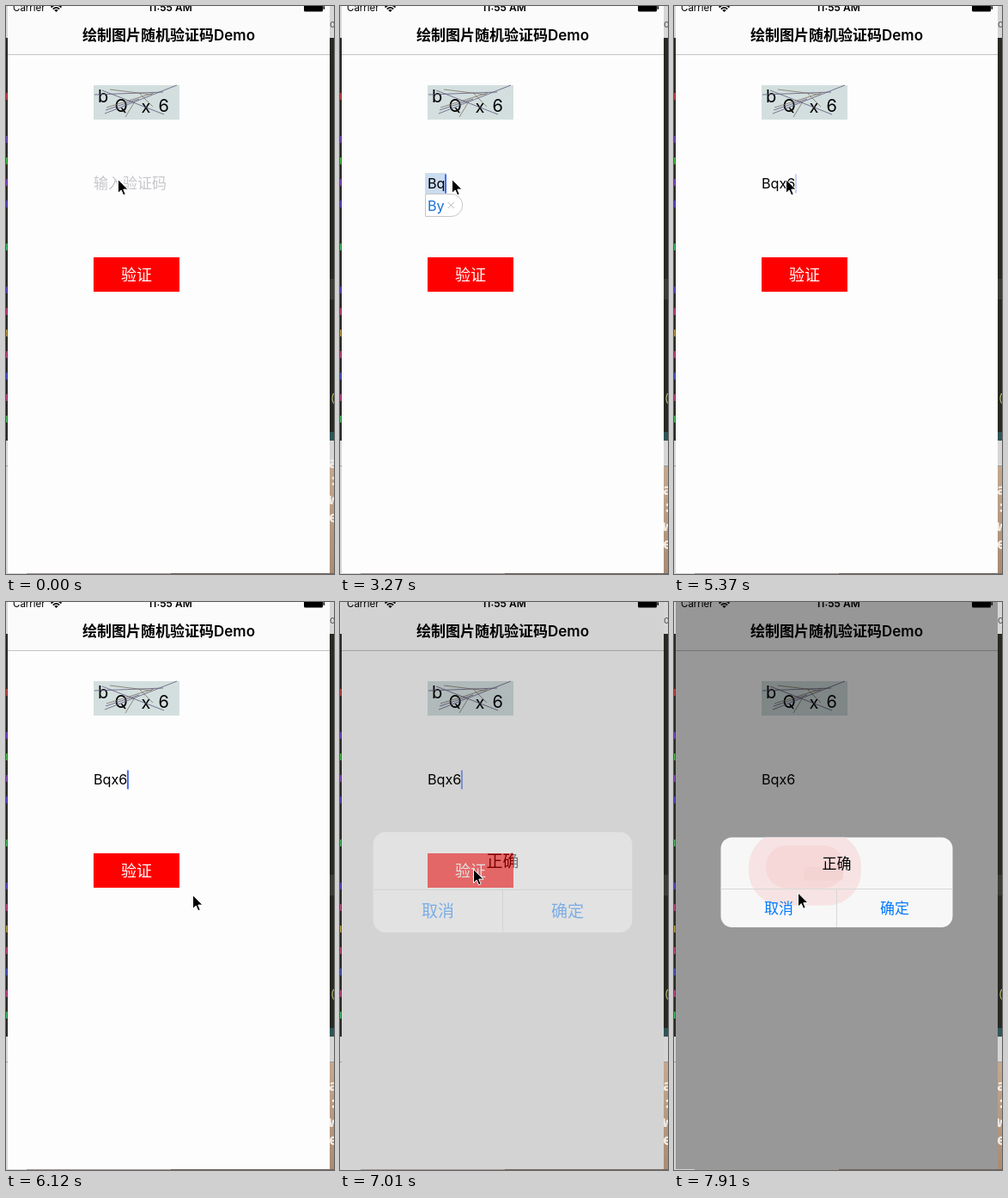
Animation of 382x660 px, one loop 8 s. Source, as an HTML page:

```html
<!DOCTYPE html>
<html lang="zh-CN">
<head>
<meta charset="utf-8">
<style>
  html, body { margin: 0; width: 100%; height: 100%; overflow: hidden; background: #ddd; }
  svg { display: block; font: 17px Inter, "Noto Sans CJK SC", "Noto Sans CJK", sans-serif; }
  .mid { text-anchor: middle; }
  .bold { font-weight: 600; }
  .medium { font-weight: 500; }
  .code { font: bold 18px "Noto Sans Mono", monospace; }
  .field { font-size: 16.2px; }
</style>
</head>
<body>
<svg width="382" height="660" viewBox="0 0 382 660">
  <defs>
    <linearGradient id="tan" x2="0" y2="1">
      <stop stop-color="#c4a88f"/><stop offset="1" stop-color="#a98b73"/>
    </linearGradient>
    <clipPath id="plate"><rect x="54.500" y="273.500" width="270" height="104.500" rx="13"/></clipPath>
  </defs>

  <!-- desktop behind the phone window -->
  <rect width="382" height="660" fill="#d6d6d6"/>
  <rect y="37" width="382" height="468" fill="#282923"/>
  <rect y="534" width="382" height="1" fill="#999"/>
  <rect x="376" y="535" width="6" height="125" fill="url(#tan)"/>
  <rect x="377" y="317" width="5" height="24" fill="#3b3c37"/>
  <rect x="377" y="495" width="5" height="10" fill="#2f5558"/>
  <g id="specks"></g>
  <text x="377" y="25" font-size="11" fill="#555">or</text>
  <text x="378" y="460" font-size="13" fill="#b9c07a">(</text>
  <g id="scroll" class="code" fill="#f3ece5">
    <text x="376" y="537">a</text><text x="376" y="557">:</text>
    <text x="376" y="579">w</text><text x="376" y="600">e</text>
  </g>

  <!-- phone screen -->
  <rect x="2" width="375" height="659" fill="#fdfdfd"/>
  <rect x="2" width="375" height="56" fill="#fbfbfb"/>
  <path d="M2 56.5H377" stroke="#c3c3c3"/>
  <path d="M24 659.5H192" stroke="#a49a96"/>
  <path d="M192 659.5H382" stroke="#74675f"/>
  <text x="8" y="6" font-size="11.5">Carrier</text>
  <path d="M52.500 1.500Q58.500-4 64.500 1.500M54.800 3.600Q58.500.3 62.200 3.600" fill="none" stroke="#000" stroke-width="1.7"/>
  <path d="M56.200 4.800Q58.500 3 60.800 4.800L58.500 7Z"/>
  <text class="mid bold" x="191" y="6" font-size="12">11:55 AM</text>
  <rect x="347" y="-3" width="22" height="9.500" rx="1.500"/>
  <rect x="369.500" y="0" width="1.500" height="4" rx=".7"/>
  <text class="mid bold" x="189.500" y="40">绘制图片随机验证码Demo</text>

  <rect x="102" y="92" width="100" height="40" fill="#d3dfde"/>
  <g font-size="20">
    <text x="107" y="111.500">b</text><text x="126.500" y="123">Q</text>
    <text x="157.500" y="124">x</text><text x="177.500" y="123">6</text>
  </g>
  <g fill="none" stroke-width=".8">
    <path d="M103 103L183 100M115 125L199 92M112 98L184 126M116 121L155 108" stroke="#5f587c"/>
    <path d="M121 97L170 103M117 118L172 101M139 129L150 111M155 101L171 117" stroke="#7c7063"/>
  </g>

  <rect id="mark" x="99" y="194" height="24" fill="#cbdcf0"/>
  <text id="hint" x="102" y="212" fill="#c7c7cd">输入验证码</text>
  <text id="typed" class="field" x="102" y="212"></text>
  <rect id="caret" y="195.500" width="2" height="22" fill="#426bf2"/>
  <g id="popup">
    <path id="bubble" fill="#fff" stroke="#c6c6c6"/>
    <text id="guess" class="field" x="102" y="237.500" fill="#1670d8"></text>
    <path id="cross" d="M-3.500-3.500L3.500 3.500M3.500-3.500L-3.500 3.500" stroke="#b4b4b4"/>
  </g>

  <rect x="102" y="292" width="100" height="40" fill="#f00"/>
  <text class="mid" x="152" y="318.500" font-size="18" font-weight="300" fill="#fff">验证</text>

  <rect id="dim" x="2" width="375" height="659"/>
  <g id="alert">
    <rect x="54.500" y="273.500" width="270" height="104.500" rx="13" fill="#f7f7f7"/>
    <g id="glow" clip-path="url(#plate)">
      <rect x="87" y="268" width="131" height="84.500" rx="39" fill="#f7e3e3"/>
      <rect x="107" y="283" width="91" height="49.500" rx="24" fill="#f6d8d8"/>
      <rect x="151" y="308" width="46" height="16" rx="5" fill="#f4d3d3"/>
    </g>
    <path d="M54.500 333.500H324.500M189.500 333.500V378" stroke="#d8d8d8" fill="none"/>
    <text class="mid medium" x="189.500" y="309.500">正确</text>
    <g fill="#007aff">
      <text class="mid medium" x="122" y="362">取消</text>
      <text class="mid" x="257" y="362">确定</text>
    </g>
  </g>
  <path id="cursor" d="M0 0V16L3.700 12.600 6.200 18.300 8.700 17.200 6.300 11.600H11.500Z" stroke="#fff"/>
</svg>
<script>
const $ = id => document.getElementById(id);
const set = (id, attrs) => {
  for (const name in attrs) $(id).setAttribute(name, attrs[name]);
};
const clamp = x => Math.min(1, Math.max(0, x));
const ramp = (t, from, to) => clamp((t - from) / (to - from));
const smooth = x => x * x * (3 - 2 * x);

// Ends of code lines showing at the left edge
let seed = 7;
const random = () => (seed = seed * 16807 % 2147483647) / 2147483647;
for (let y = 105; y < 500; y += 25) {
  const color = `hsl(${random() * 360} 45% 50%)`;
  if (random() > .3) $('specks').innerHTML += `<rect y="${y - 4}" width="1.500" height="8" fill="${color}"/>`;
}

const strokes = [[1020, ''], [1910, 'B'], [2210, 'Bq'], [3700, 'Bqx'], [4750, 'Bqx6']];
const guesses = { Bq: 'By', Bqx: 'Box' };

// The caret restarts its cycle with every key press
function caretOpacity(age) {
  const phase = age % 1050;
  return age < 0 ? 0 : 1 - ramp(phase, 500, 650) + ramp(phase, 900, 1050);
}

// Pointer stops: start time, end time, x, y
const moves = [[5350, 5950, 229, 346], [5950, 6540, 155.5, 310.5], [7590, 7740, 171, 334], [7740, 7890, 144.5, 338]];
function pointer(t) {
  let x = 130.5, y = 201.5;
  for (const [from, to, toX, toY] of moves) {
    const p = smooth(ramp(t, from, to));
    x += (toX - x) * p;
    y += (toY - y) * p;
  }
  return [x, y];
}

// Critically damped spring
function spring(age) {
  const w = .022 * Math.max(0, age);
  return 1 - (1 + w) * Math.exp(-w);
}

function draw(t) {
  const [pressed, text] = strokes.filter(s => s[0] <= t).pop() || [Infinity, ''];
  const shown = spring(t - 6928);
  $('typed').textContent = text;
  const end = 102 + $('typed').getComputedTextLength() - .5;
  set('hint', { opacity: text ? 0 : 1 });
  set('caret', { x: end, opacity: caretOpacity(t - pressed) * (1 - shown) });

  const guess = guesses[text];
  set('mark', { width: end - 97, opacity: guess ? 1 : 0 });
  set('popup', { opacity: guess && t > 2360 ? 1 : 0 });
  $('guess').textContent = guess || '';
  const right = 123 + $('guess').getComputedTextLength();
  set('bubble', { d: `M99.5 218.500H${right - 13}a13 13 0 0 1 0 26H99.5Z` });
  set('cross', { transform: `translate(${right - 13.5} 231.500)` });

  set('scroll', { transform: `translate(0 ${31 * smooth(ramp(t, 430, 840))})` });
  set('dim', { opacity: .4 * shown });
  set('alert', {
    opacity: shown,
    transform: `translate(189.500 326) scale(${1.2 - .2 * shown}) translate(-189.500 -326)`
  });
  set('glow', { opacity: shown > .99 ? 1 : 0 });
  set('cursor', { transform: `translate(${pointer(t)})` });
}

const STEP = 149.2;
const start = performance.now();
function tick() {
  const t = (performance.now() - start) % 8000;
  draw(Math.max(0, Math.floor((t + 20) / STEP) * STEP - 20));
  requestAnimationFrame(tick);
}
tick();
</script>
</body>
</html>
```
